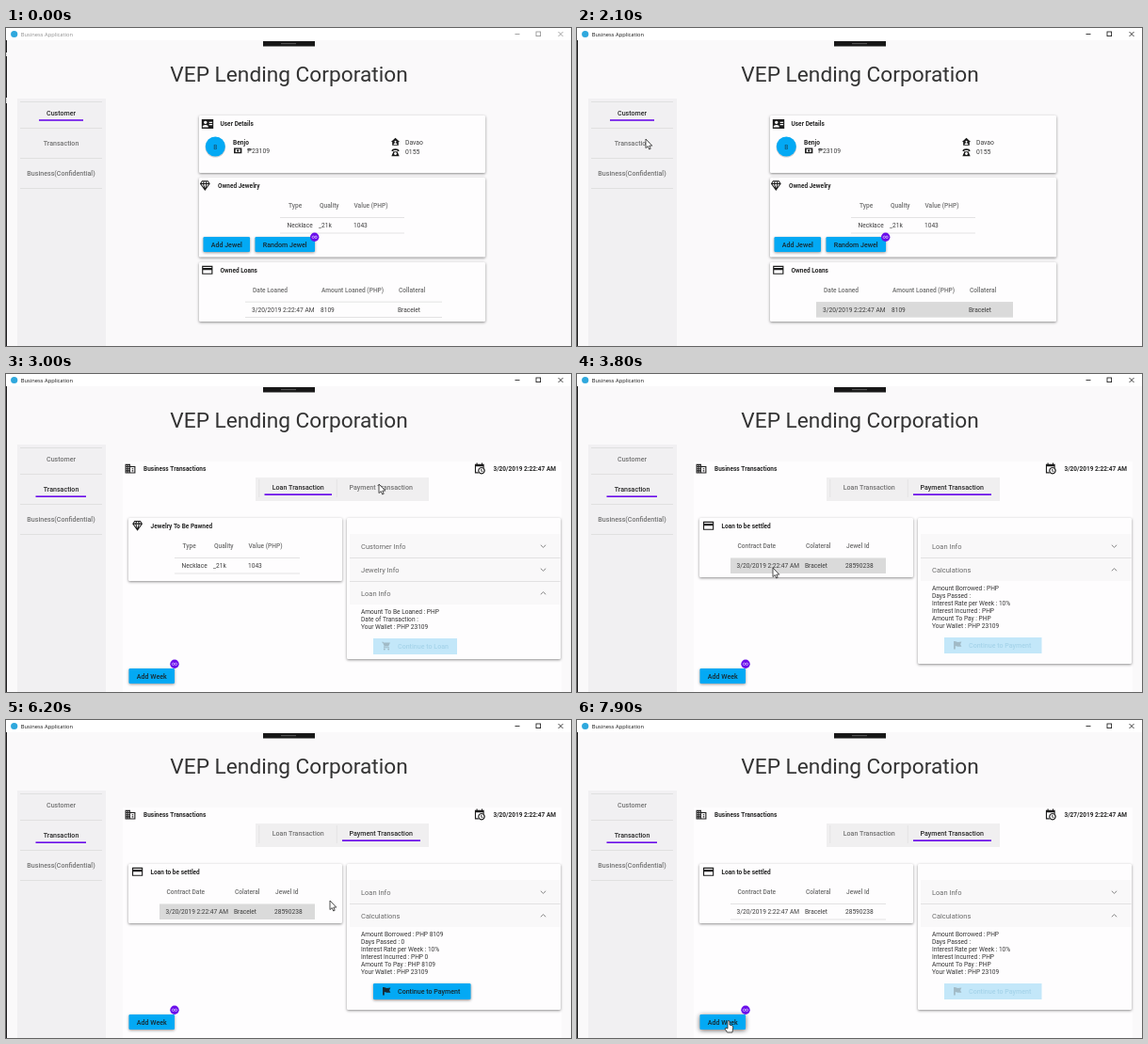
Animation, 600 px wide and 338 px high, one loop 8 s. Source, as an HTML page with a canvas:

```html
<!DOCTYPE html>
<html lang="en">
<head>
<meta charset="utf-8">
<title>Business Application</title>
<style>
html, body { margin: 0; width: 600px; height: 338px; overflow: hidden; background: #faf9fa; }
canvas { display: block; width: 600px; height: 338px; }
</style>
</head>
<body>
<canvas id="stage"></canvas>
<script>
const W = 600, H = 338, LOOP = 8000, STEP = 100;
const canvas = document.getElementById('stage');
const ctx = canvas.getContext('2d');
const dpr = window.devicePixelRatio || 1;
canvas.width = W * dpr;
canvas.height = H * dpr;

const BLUE = '#03a9f4', PURPLE = '#6a0dea', INK = '#262626', GRAY = '#6e6e6e', RULE = '#dcdcdc';

// Moments at which the interface changes
const AT = { focus: 700, hover: 800, loan: 2300, pay: 3300, pick: 3700, calc: 4000, press: 6800, week: 7200 };

// Pointer stops: time, x, y
const STOPS = [
  [400, 420, 340], [900, 407, 303], [1200, 407, 303], [1900, 73, 118],
  [2350, 73, 118], [2950, 396, 117], [3300, 396, 117], [3700, 208, 206],
  [4150, 208, 206], [4400, 166, 232], [4650, 200, 278], [4900, 276, 193],
  [5000, 455, 145], [5300, 534, 118], [5600, 480, 108], [5900, 527, 105],
  [6050, 527, 105], [6200, 344, 192], [6800, 161, 320]
];

// Icons on a 24 unit grid
const ICONS = {
  idCard: 'M1 3H23V21H1ZM8 6a3 3 0 1 0 .1 0ZM2.5 18H13.5C13.5 12.500 2.500 12.500 2.500 18ZM15 8H21V10H15ZM15 12H21V14H15Z',
  person: 'M7 4a3.500 3.500 0 1 0 .1 0ZM0 20H14C14 11 0 11 0 20ZM14 5H23V7H14ZM15 10H23V12H15ZM16 15H23V17H16Z',
  cash: 'M2 5H22V19H2ZM6 8V16H18V8ZM12 9a3 3 0 1 0 .1 0Z',
  house: 'M12 2L1 12H4V21H20V12H23ZM12 9a2.300 2.300 0 1 0 .1 0ZM7.500 19H16.500C16.500 14 7.500 14 7.500 19Z',
  phone: 'M2 9C2 1 22 1 22 9L17 10V7H7V10ZM7 10H17L22 22H2ZM12 12a3.500 3.500 0 1 0 .1 0Z',
  gem: 'M6 2H18L22 8L12 22L2 8ZM7 4L5 7H8L9 4ZM11 4L10 7H14L13 4ZM15 4L16 7H19L17 4ZM5 9L10 16L8 9ZM10 9L12 17L14 9ZM16 9L14 16L19 9Z',
  card: 'M2 4H22V20H2ZM4 6V8H20V6ZM4 12V18H20V12Z',
  office: 'M2 3H12V7H22V21H2ZM4 5V7H6V5ZM8 5V7H10V5ZM4 9V11H6V9ZM8 9V11H10V9ZM4 13V15H6V13ZM8 13V15H10V13ZM4 17V19H6V17ZM8 17V19H10V17ZM12 9V19H20V9ZM15 11H18V13H15ZM15 15H18V17H15Z',
  clock: 'M3 3H6V1H8V3H16V1H18V3H21V11L19 10V8H5V19H9L11 21H3ZM16 9a7 7 0 1 0 .1 0ZM16 11.200a4.800 4.800 0 1 1-.1 0ZM15 12.500H16.600V16L19 17.400L18 18.600L15 17Z',
  cart: 'M1 2H4.500L5.500 4H21L17 13H8L7.500 15H19V17H5L6.500 12L3 4H1ZM7 18a2 2 0 1 0 .1 0ZM17 18a2 2 0 1 0 .1 0Z',
  flag: 'M3 3H6L13 5L22 4L19 10L22 16L13 16L7 14V22H3Z'
};
for (const k in ICONS) ICONS[k] = new Path2D(ICONS[k]);

const ARROW = new Path2D('M0 0V9.600L2.200 7.600L3.700 11L5.200 10.300L3.800 7.100H6.800Z');
const HAND = new Path2D('M-1 0Q0-1 1 0V4L4 5Q5 5.300 4.700 7L4 12H-1.500L-4 8Q-3.500 6.500-1 8Z');

function box(x, y, w, h, color) {
  ctx.fillStyle = color;
  ctx.fillRect(x, y, w, h);
}

function text(str, x, y, size = 6.6, color = INK, weight = 400, align = 'left', family = 'Roboto') {
  ctx.font = `${weight} ${size}px ${family}, sans-serif`;
  ctx.textAlign = align;
  ctx.fillStyle = color;
  ctx.fillText(str, x, y + size * 0.355);
}

function disc(x, y, r, color) {
  ctx.fillStyle = color;
  ctx.beginPath();
  ctx.arc(x, y, r, 0, Math.PI * 2);
  ctx.fill();
}

function line(points, color, width = 0.8) {
  ctx.strokeStyle = color;
  ctx.lineWidth = width;
  ctx.beginPath();
  points.forEach(([x, y]) => ctx.lineTo(x, y));
  ctx.stroke();
}

const rule = (x1, x2, y) => box(x1, y - 0.4, x2 - x1, 0.8, RULE);

function icon(name, cx, cy, size, color = '#1c1c1c') {
  ctx.save();
  ctx.translate(cx - size / 2, cy - size / 2);
  ctx.scale(size / 24, size / 24);
  ctx.fillStyle = color;
  ctx.fill(ICONS[name], 'evenodd');
  ctx.restore();
}

function raised(x, y, w, h, color, blur = 3, alpha = 0.45) {
  ctx.save();
  ctx.shadowColor = `rgba(0,0,0,${alpha})`;
  ctx.shadowBlur = blur * dpr;
  ctx.shadowOffsetY = dpr;
  ctx.fillStyle = color;
  ctx.beginPath();
  ctx.roundRect(x, y, w, h, 1.2);
  ctx.fill();
  ctx.restore();
}

const card = (x1, y1, x2, y2) => raised(x1, y1, x2 - x1, y2 - y1, '#fefdfe');

function button(label, x, y, w, hot) {
  raised(x, y, w, 16, BLUE, hot ? 5 : 3, hot ? 0.6 : 0.4);
  text(label, x + w / 2, y + 8.2, 7.1, '#17282f', 500, 'center');
}

function badge(x, y) {
  disc(x, y, 4.7, PURPLE);
  ctx.strokeStyle = '#e2d2ff';
  ctx.lineWidth = 0.7;
  for (const dx of [-1.4, 1.4]) {
    ctx.beginPath();
    ctx.arc(x + dx, y, 1.2, 0, Math.PI * 2);
    ctx.stroke();
  }
}

function table(x1, x2, cols, headY, heads, cells, picked) {
  const rowY = headY + 20.7, top = rowY - 8.2, end = rowY + 8.3;
  if (picked) box(x1, top, x2 - x1, end - top, '#dadada');
  else { rule(x1, x2, top); rule(x1, x2, end); }
  heads.forEach((s, i) => text(s, cols[i][0], headY, 6.6, GRAY, 500));
  cells.forEach((s, i) => text(s, cols[i][1], rowY, 6.6, '#3c3c3c'));
}

function windowFrame(active, bare) {
  const tone = active ? '#111' : '#8d8d8d';
  box(0, 0, W, H, '#faf9fa');
  box(0, 0, W, 13, '#fff');
  box(0, 13, 1, H, '#1b1b1b');
  if (bare) { box(0, 26, 1, 4, '#ddd'); box(0, 74, 1, 6, '#ddd'); }
  disc(8.7, 6.5, 3.6, '#2fa8dd');
  text('Business Application', 15.8, 6.6, 5.75, tone, 400, 'left', '"Open Sans"');
  line([[540.5, 6.5], [545.5, 6.5]], tone);
  ctx.strokeRect(563, 4, 4.6, 4.6);
  line([[586.5, 4], [591.5, 9]], tone);
  line([[591.5, 4], [586.5, 9]], tone);
  box(273, 14, 55, 5.5, '#181818');
  box(292, 16.3, 16, 0.8, '#6c6c6c');
  text('VEP Lending Corporation', 300.5, 48.7, 22.7, '#333', 400, 'center');
}

function sidebar(second) {
  box(12, 75, 94, H - 75, '#f1f0f2');
  [78.5, 106.5, 138.5, 170.5].forEach(y => rule(15, 102, y));
  ['Customer', 'Transaction', 'Business(Confidential)'].forEach((s, i) => {
    const on = i === (second ? 1 : 0);
    text(s, 58.5, 90 + 32 * i, 7.1, on ? INK : '#737373', 500, 'center');
  });
  if (second) box(31.5, 129.4, 53.5, 1.6, PURPLE);
  else box(35, 97.2, 47, 1.6, PURPLE);
}

function customerPage(picked) {
  card(205, 93, 509, 154);
  icon('idCard', 214, 102, 13.5);
  text('User Details', 227.5, 102, 6.5, INK, 700);
  disc(222.3, 126.8, 10.8, 'rgba(0,0,0,.18)');
  disc(222.3, 126, 10.5, BLUE);
  text('B', 222.3, 126.2, 6.6, '#17465c', 400, 'center');
  text('Benjo', 241, 121.3, 6.6, INK, 700);
  icon('cash', 246.2, 130.4, 10);
  text('₱23109', 256, 130.6, 6.8, '#3c3c3c');
  icon('house', 413.5, 121, 10);
  icon('phone', 413.5, 132, 10);
  text('Davao', 424, 121.3, 6.8, '#3c3c3c');
  text('0155', 424, 132, 6.8, '#3c3c3c');

  card(205, 159, 509, 243.5);
  icon('gem', 211.3, 167.6, 13);
  text('Owned Jewelry', 225, 168, 6.5, INK, 700);
  table(291, 423, [[300, 298.5], [333, 332], [369.5, 369]], 189,
    ['Type', 'Quality', 'Value (PHP)'], ['Necklace', '_21k', '1043']);
  button('Add Jewel', 209.5, 222, 49.5);
  button('Random Jewel', 264.5, 222, 63.5);
  badge(327.7, 222.3);

  card(205, 249, 509, 312);
  icon('card', 213.8, 257.3, 13.5);
  text('Owned Loans', 227.5, 257.8, 6.5, INK, 700);
  table(254, 463, [[262, 261], [335, 334], [417, 416]], 278.6,
    ['Date Loaned', 'Amount Loaned (PHP)', 'Collateral'],
    ['3/20/2019 2:22:47 AM', '8109', 'Bracelet'], picked);
}

function expander(label, y, open) {
  text(label, 377, y, 7.5, '#6a6a6a');
  const d = open ? -1.3 : 1.3;
  line([[567.8, y - d], [570.5, y + d], [573.2, y - d]], '#777', 0.9);
}

function action(label, glyph, y, w, ready) {
  if (ready) raised(390, y, w, 17, BLUE);
  else box(390, y, w, 17, '#c3e7f9');
  icon(glyph, 404, y + 8, 10.5, ready ? '#152a35' : '#a1bac6');
  text(label, 416, y + 8.7, 7.1, ready ? '#17282f' : '#a6d4ea', 500);
}

function lines(rows, y) {
  rows.forEach((s, i) => text(s, 377, y + 8 * i, 6.6, '#333'));
}

function loanView() {
  card(130, 153, 357, 220);
  icon('gem', 139.6, 161.3, 13);
  text('Jewelry To Be Pawned', 153.5, 161.8, 6.5, INK, 700);
  table(179, 312, [[187.5, 186.5], [221, 220], [257.5, 257]], 183,
    ['Type', 'Quality', 'Value (PHP)'], ['Necklace', '_21k', '1043']);

  card(362, 153, 589, 303);
  box(365, 170, 223.5, 75, '#f9f8f9');
  rule(365, 588.5, 195.5);
  rule(365, 588.5, 220.5);
  expander('Customer Info', 183, false);
  expander('Jewelry Info', 208, false);
  expander('Loan Info', 233, true);
  lines(['Amount To Be Loaned : PHP', 'Date of Transaction :', 'Your Wallet : PHP 23109'], 253);
  action('Continue to Loan', 'cart', 281, 89, false);
}

function paymentView(picked, ready) {
  card(130, 153, 357, 216);
  icon('card', 139.6, 161.3, 13.5);
  text('Loan to be settled', 153.5, 161.8, 6.5, INK, 700);
  table(163, 328, [[170.5, 169.5], [243, 242], [286, 285]], 183,
    ['Contract Date', 'Colateral', 'Jewel Id'],
    ['3/20/2019 2:22:47 AM', 'Bracelet', '28590238'], picked);

  card(362, 153, 589, 308);
  box(365, 170, 223.5, 50, '#f9f8f9');
  rule(365, 588.5, 195.5);
  expander('Loan Info', 183, false);
  expander('Calculations', 208, true);
  const v = s => ready ? ' ' + s : '';
  lines([
    'Amount Borrowed : PHP' + v('8109'), 'Days Passed :' + v('0'),
    'Interest Rate per Week : 10%', 'Interest Incurred : PHP' + v('0'),
    'Amount To Pay : PHP' + v('8109'), 'Your Wallet : PHP 23109'
  ], 228);
  action('Continue to Payment', 'flag', 280, 103.5, ready);
}

function transactionPage(t) {
  const pay = t >= AT.pay, later = t >= AT.week;
  box(124, 93, 466, H - 93, '#fefdfe');
  icon('office', 132, 100.7, 13);
  text('Business Transactions', 146, 100.8, 6.5, INK, 700);
  icon('clock', 502.8, 100.5, 13);
  text(`3/${later ? 27 : 20}/2019 2:22:47 AM`, 584, 100.8, 6.5, INK, 700, 'right');

  box(265, 110, 184, 25, '#f0eff0');
  box(268.5, 112, 0.7, 19, '#dedede');
  box(350.8, 112, 0.7, 19, '#dedede');
  text('Loan Transaction', 310.2, 120.2, 7.1, pay ? '#737373' : INK, 500, 'center');
  text('Payment Transaction', 398.2, 120.2, 7.1, pay ? INK : '#737373', 500, 'center');
  if (pay) box(357, 127.3, 83, 1.7, PURPLE);
  else box(274.5, 127.3, 71.5, 1.7, PURPLE);

  if (pay) paymentView(t >= AT.pick && !later, t >= AT.calc && !later);
  else loanView();
  button('Add Week', 130.5, 313, 48.5, t >= AT.press);
  badge(179, 308.3);
}

function pointer(t) {
  if (t < STOPS[0][0]) return;
  const i = STOPS.findIndex(s => s[0] > t);
  let [, x, y] = STOPS[STOPS.length - 1];
  if (i > 0) {
    const [t0, x0, y0] = STOPS[i - 1], [t1, x1, y1] = STOPS[i];
    const u = (t - t0) / (t1 - t0), e = u * u * (3 - 2 * u);
    x = x0 + (x1 - x0) * e;
    y = y0 + (y1 - y0) * e;
  }
  const shape = t >= AT.press ? HAND : ARROW;
  ctx.save();
  ctx.translate(x, y);
  ctx.fillStyle = '#fff';
  ctx.strokeStyle = '#222';
  ctx.lineWidth = 0.8;
  ctx.fill(shape);
  ctx.stroke(shape);
  ctx.restore();
}

function draw(t) {
  ctx.setTransform(dpr, 0, 0, dpr, 0, 0);
  windowFrame(t >= AT.focus, t < 300);
  sidebar(t >= AT.loan);
  if (t < AT.loan) customerPage(t >= AT.hover);
  else transactionPage(t);
  pointer(t);
}

// The screen refreshes ten times a second
const start = performance.now();
function tick() {
  const ms = (performance.now() - start) % LOOP;
  draw(Math.floor(ms / STEP) * STEP);
  requestAnimationFrame(tick);
}
tick();
</script>
</body>
</html>
```
